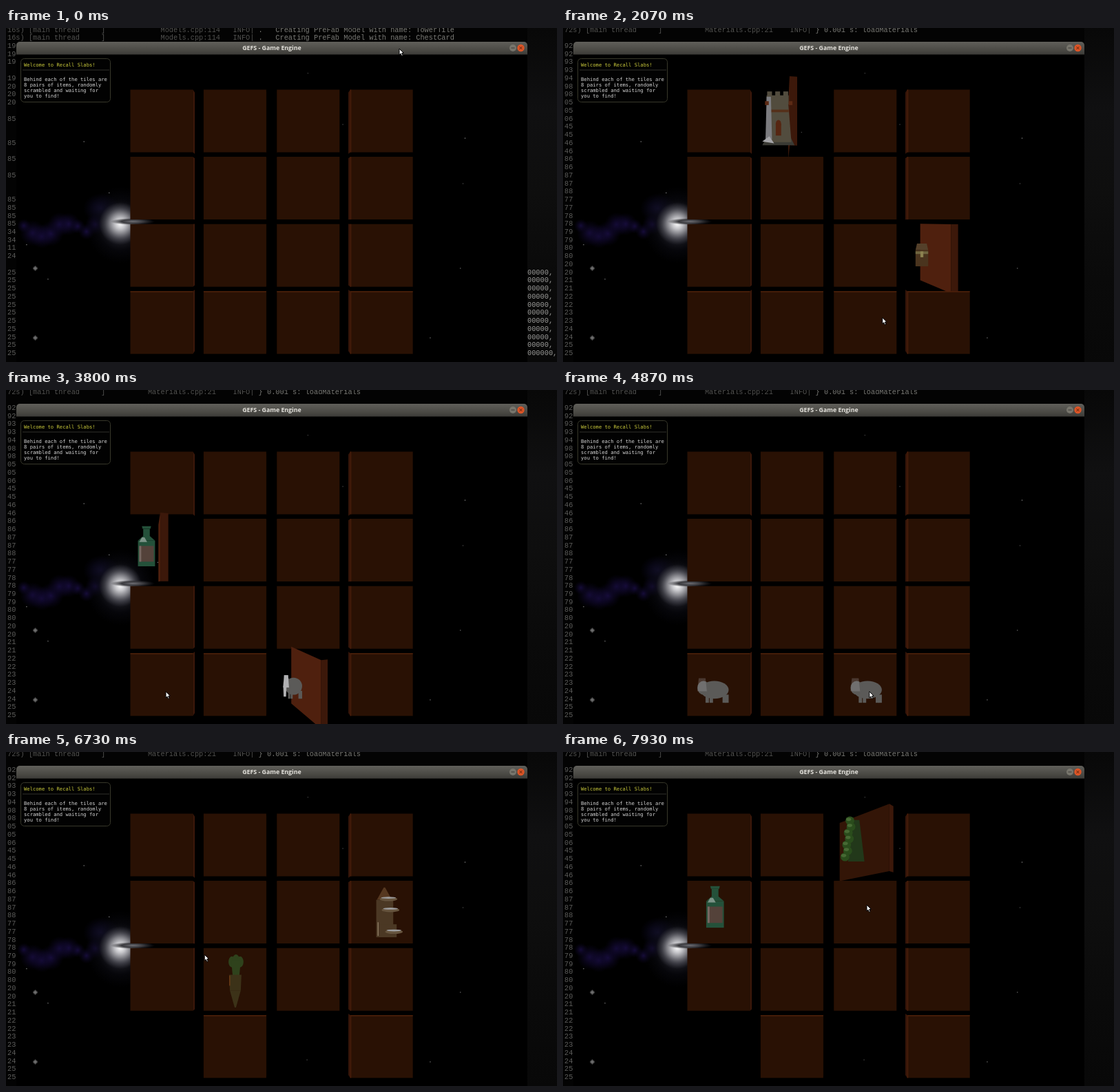
An HTML page with a canvas that plays this animation: 800x485 px, repeating every 8 s.

```html
<!DOCTYPE html>
<html lang="en">
<head>
<meta charset="utf-8">
<title>Tile game</title>
<style>
  html, body { margin: 0; width: 100%; height: 100%; overflow: hidden; background: #000; }
  canvas { display: block; width: 800px; height: 485px; }
</style>
</head>
<body>
<canvas id="stage" width="800" height="485"></canvas>
<script>
const ctx = document.getElementById('stage').getContext('2d');
const LOOP = 8000, FLIP = 400, FOCAL = 440;
const EYE = { x: 386, y: 281 };
const HALF = 45.5, THICK = 5, ITEM_DEPTH = 24;
const colX = col => 226 + col * 106.4;
const rowY = row => 135 + row * 97.6;
const LOG_CHANGE = 140;

const clamp = v => Math.max(0, Math.min(1, v));
const smooth = k => k * k * (3 - 2 * k);

function seeded(seed) {
  return () => (seed = (seed * 16807) % 2147483647) / 2147483647;
}

function fillPoly(points, color) {
  ctx.fillStyle = color;
  ctx.beginPath();
  points.forEach(([x, y]) => ctx.lineTo(x, y));
  ctx.closePath();
  ctx.fill();
}
function rect(x, y, w, h, color) {
  ctx.fillStyle = color;
  ctx.fillRect(x, y, w, h);
}
function oval(x, y, rx, ry, color) {
  ctx.fillStyle = color;
  ctx.beginPath();
  ctx.ellipse(x, y, rx, ry, 0, 0, Math.PI * 2);
  ctx.fill();
}
// Symmetric trapezoid around x, from half width a at the top to b at the bottom
function taper(x, top, a, bottom, b, color) {
  fillPoly([[x - a, top], [x + a, top], [x + b, bottom], [x - b, bottom]], color);
}
function glow(x, y, rx, ry, ...colors) {
  const g = ctx.createRadialGradient(0, 0, 0, 0, 0, 1);
  colors.forEach((color, i) => g.addColorStop(i / (colors.length - 1), color));
  ctx.save();
  ctx.translate(x, y);
  ctx.scale(rx, ry);
  oval(0, 0, 1, 1, g);
  ctx.restore();
}
function write(text, x, y, font, color) {
  ctx.font = font;
  ctx.fillStyle = color;
  ctx.fillText(text, x, y);
}

// Items are drawn around the projected centre of their tile; lit is 0..1.
// round: share of the width that stays when the item is seen from the side
const items = {
  tower: { round: 0.8, draw() {
    taper(5, 24, 22, 37, 30, '#3a3a34');
    taper(5, -30, 18, 32, 24, '#524c3e');
    rect(-17, -40, 41, 14, '#524c3e');
    for (let i = 0; i < 3; i++) rect(-16 + i * 15, -46, 9, 8, '#524c3e');
    taper(-13, -38, 4, 28, 6, '#7c7c80');
    fillPoly([[-25, 31], [-12, 23], [-3, 34]], '#a4a4a8');
    rect(-8, -18, 32, 4, '#55301a');
    for (const x of [-20, 24]) rect(x, -31, 7, 6, '#5c2a14');
    oval(5, 4, 5, 6, '#562612');
    rect(0, 4, 10, 18, '#562612');
  } },
  chest: { round: 0.5, draw() {
    taper(0, -18, 13, -8, 17, '#54402a');
    rect(-17, -8, 34, 25, '#4a341e');
    rect(-17, -6, 34, 4, '#706640');
    rect(-4, -6, 8, 9, '#8c8250');
  } },
  sheep: { round: 0.4, draw(lit) {
    const wool = '#5b5a58';
    for (const x of [-12, -6, 13, 17]) rect(x, 8, 5, 12, wool);
    oval(1, 1, 21, 13, wool);
    oval(-15, -2, 9, 10, wool);
    ctx.globalAlpha = 0.25 + 0.75 * lit;
    taper(-17, -16, 5, 3, 7, '#b0b0b2');
    ctx.globalAlpha = lit;
    taper(-20, 0, 4, 17, 3, '#b0b0b2');
    ctx.globalAlpha = 1;
  } },
  bottle: { round: 1, draw() {
    const glass = '#24513a';
    taper(2, -36, 7, -32, 6, glass);
    rect(-3, -32, 10, 12, glass);
    taper(2, -21, 5, -14, 13, glass);
    rect(-11, -14, 26, 39, glass);
    taper(-3, -19, 2, -12, 6, '#7c9488');
    rect(-9, -6, 22, 24, '#54423a');
    rect(-9, -6, 3, 24, '#776862');
  } },
  house: { round: 0.5, draw() {
    taper(-3, -34, 1, -16, 11, '#563820');
    rect(-15, -16, 25, 55, '#4b3824');
    rect(-10, 20, 25, 19, '#4b3824');
    for (const [x, y] of [[3, -18], [6, -2], [11, 30]]) {
      oval(x, y + 1, 13, 3, '#66543e');
      oval(x, y - 1, 11, 1.4, '#9c9c9e');
    }
    rect(-13, 17, 1.5, 20, '#8a7860');
  } },
  carrot: { round: 0.9, draw() {
    for (let i = -1; i <= 1; i++) oval(4 + i * 6, -31 + Math.abs(i) * 3, 5, 8, '#2f421c');
    taper(4, -30, 7, -8, 5, '#2f421c');
    taper(3, -9, 9, 14, 8, '#3c3218');
    taper(3, 14, 8, 39, 1, '#3c3218');
    rect(-6, -8, 1.5, 15, '#6a3a16');
  } },
  tree: { round: 0.8, draw() {
    taper(3, -33, 5, 29, 13, '#22381a');
    for (let i = 0; i < 7; i++) {
      const x = -7 - i * 1.3 + (i % 2) * 3, y = -32 + i * 9;
      oval(x, y, 7, 6.5, '#2a4c1c');
      oval(x - 2, y - 2, 4, 2.5, '#476a34');
    }
  } }
};

// Each click turns a tile; back is when a wrong pair turns again.
const clicks = [
  { at: 600, col: 1, row: 0, back: 1890 },
  { at: 1131, col: 3, row: 2, back: 1890 },
  { at: 2330, col: 2, row: 3, back: 3650 },
  { at: 2900, col: 0, row: 1, back: 3650 },
  { at: 3930, col: 0, row: 3 },
  { at: 4440, col: 2, row: 3 },
  { at: 5520, col: 3, row: 1, back: 6860 },
  { at: 6100, col: 1, row: 2, back: 6860 },
  { at: 7110, col: 0, row: 1 },
  { at: 7630, col: 2, row: 0 }
];
const PAIR_FOUND = 5220;
const hidden = { '1,0': 'tower', '3,2': 'chest', '2,3': 'sheep', '0,3': 'sheep',
  '0,1': 'bottle', '3,1': 'house', '1,2': 'carrot', '2,0': 'tree' };

const tiles = Array.from({ length: 16 }, (_, i) => {
  const col = i % 4, row = i >> 2;
  return { col, row, name: hidden[col + ',' + row],
    turns: clicks.filter(c => c.col === col && c.row === row) };
});

function angleAt(tile, t) {
  let open = 0;
  for (const { at, back = Infinity } of tile.turns) {
    open += clamp((t - at) / FLIP) - clamp((t - back) / FLIP);
  }
  return open * Math.PI;
}

function project(tile, angle, x, y, z) {
  const sin = Math.sin(angle), cos = Math.cos(angle);
  const scale = FOCAL / (FOCAL + THICK + x * sin - z * cos);
  return [
    EYE.x + (colX(tile.col) + x * cos + z * sin - EYE.x) * scale,
    EYE.y + (rowY(tile.row) + y - EYE.y) * scale,
    scale
  ];
}

function drawItem(tile, angle, lit) {
  if (!tile.name || angle === 0) return;
  const { round, draw } = items[tile.name];
  const [x, y, scale] = project(tile, angle, 0, 0, -ITEM_DEPTH);
  const size = scale * (FOCAL - ITEM_DEPTH) / FOCAL;
  ctx.save();
  ctx.translate(x, y);
  ctx.scale(size * (round + (1 - round) * Math.abs(Math.cos(angle))), size);
  draw(lit);
  ctx.restore();
}

// Draws one upright side of the slab, from edge a to edge b, if it faces the viewer.
function drawFace(tile, angle, a, b, color) {
  const corner = ([x, z], y) => project(tile, angle, x * HALF, y * HALF, z * THICK);
  const face = [corner(a, -1), corner(b, -1), corner(b, 1), corner(a, 1)];
  if (face[1][0] > face[0][0]) fillPoly(face, color);
}

function drawTile(tile, t) {
  if (tile.name === 'sheep' && t >= PAIR_FOUND) return;
  const angle = angleAt(tile, t), open = angle > Math.PI / 2;
  const lit = open ? clamp((Math.sin(angle) - 0.65) / 0.2) : 0;
  if (!open) drawItem(tile, angle, 0);
  drawFace(tile, angle, [-1, 1], [1, 1], '#291104');
  drawFace(tile, angle, [1, -1], [-1, -1], `rgb(${41 + 38 * lit},${17 + 15 * lit},${4 + 10 * lit})`);
  drawFace(tile, angle, [-1, -1], [-1, 1], '#3c180a');
  drawFace(tile, angle, [1, 1], [1, -1], '#3c180a');
  if (Math.sin(angle) < 0.01) {
    const left = colX(tile.col) - HALF, top = rowY(tile.row) - HALF;
    if (tile.row === 3) rect(left, top, HALF * 2, 1.2, '#5a260c');
    if (tile.col === 3) rect(left, top, 1.5, HALF * 2, '#4a1e0a');
  }
  if (open) drawItem(tile, angle, lit);
}

const LOG_FONT = '10.3px "Liberation Mono", monospace';
const EARLY_ROWS = '###.####.#..#.#.#..########.###########';
const EARLY = [[2, 19], [7, 20], [11, 85], [25, 34], [27, 11], [28, 24], [30, 25]];
const LATE = [[2, 92], [7, 98], [9, 5], [12, 45], [16, 86], [21, 77], [29, 20]];

function logText(text, col, row, color = '#525250') {
  write(text, 2 + col * 6.18, 5.5 + row * 11.74, LOG_FONT, color);
}
function logLine(row, stamp, fileCol, file, message) {
  logText(stamp + 's) [main thread     ]', 0, row);
  logText(file, fileCol, row);
  logText('INFO|', 53, row);
  logText(message, 59, row, '#7a7a76');
}

function drawDesktop(t) {
  rect(0, 0, 800, 485, '#030303');
  const side = ctx.createLinearGradient(0, 0, 0, 485);
  ['#080808', '#101011', '#0e0e0e', '#0a0a0a', '#080808'].forEach((c, i) => side.addColorStop(i / 4, c));
  rect(757, 0, 43, 485, side);

  const early = t < LOG_CHANGE;
  if (early) {
    ['TowerTile', 'ChestCard'].forEach((model, row) =>
      logLine(row, '16', 36, 'Models.cpp:114', '.   Creating PreFab Model with name: ' + model));
    for (let row = 30; row <= 40; row++) {
      write(row < 40 ? '00000,' : '000000,', 757, 5.5 + row * 11.74, LOG_FONT, '#9a9a98');
    }
  } else {
    logLine(0, '72', 33, 'Materials.cpp:21', '} 0.001 s: loadMaterials');
  }
  for (let row = 2; row <= 40; row++) {
    if (early && EARLY_ROWS[row - 2] === '.') continue;
    const [first, value] = (early ? EARLY : LATE).findLast(block => block[0] <= row);
    const stamp = early ? value : value + (row - first >> 1);
    logText(String(stamp).padStart(2, '0'), 0, row, '#5c5c5a');
  }
}

function drawSpace() {
  rect(15, 38, 742, 447, '#000');
  const random = seeded(41);
  for (let i = 0; i < 9; i++) {
    const r = 10 + random() * 9;
    glow(26 + i * 13, 290 + (random() - 0.5) * 26, r, r, '#160c3a', '#0c062400');
  }
  glow(138, 262, 26, 22, '#141030', '#0a082000');
  glow(166, 286, 50, 56, '#505058', '#24242c', '#0c0c1480', '#08081000');
  glow(166, 284, 31, 31, '#ffffff', '#c4c4c8', '#7c7c82', '#50505890', '#40404800');
  glow(184, 281, 32, 5, '#707076', '#38383c', '#20202400');
  for (let i = 0; i < 22; i++) {
    const shade = 60 + random() * 70;
    rect(20 + random() * 720, 42 + random() * 430, 1.3, 1.3, `rgb(${shade},${shade},${shade})`);
  }
  for (const y of [349, 450]) {
    glow(42.5, y, 4, 4, '#a8a8a8', '#505050', '#30303000');
    rect(39, y - 0.4, 7, 0.8, '#666');
    rect(42.1, y - 3.5, 0.8, 7, '#666');
  }
}

function drawPanel() {
  ctx.strokeStyle = '#38382a';
  ctx.lineWidth = 1;
  ctx.beginPath();
  ctx.roundRect(21.5, 44.5, 130, 63, 5);
  ctx.fillStyle = '#020202';
  ctx.fill();
  ctx.stroke();
  rect(24, 60.5, 126, 1, '#30302a');
  const font = '7.18px "DejaVu Sans Mono", monospace';
  write('Welcome to Recall Slabs!', 26, 56, font, '#cccc3c');
  ['Behind each of the tiles are', '8 pairs of items, randomly', 'scrambled and waiting for', 'you to find!']
    .forEach((line, i) => write(line, 26, 77 + i * 8, font, '#d6d6d6'));
}

function drawTitleBar() {
  const bar = ctx.createLinearGradient(0, 20, 0, 38);
  ['#605f5a', '#504f4a', '#3e3d39'].forEach((c, i) => bar.addColorStop(i / 2, c));
  ctx.fillStyle = bar;
  ctx.beginPath();
  ctx.roundRect(15, 20, 742, 18.5, [5, 5, 0, 0]);
  ctx.fill();
  ctx.textAlign = 'center';
  write('GEFS - Game Engine', 386, 32.3, 'bold 8.8px "Open Sans", sans-serif', '#e4e2dc');
  ctx.textAlign = 'left';
  oval(736, 29, 5, 5, '#77756c');
  rect(733.5, 28.5, 5, 1, '#3c3b37');
  oval(747.5, 29, 5.2, 5.2, '#dc5426');
  ctx.strokeStyle = '#5c250d';
  ctx.beginPath();
  for (const d of [-2, 2]) {
    ctx.moveTo(747.5 - d, 27);
    ctx.lineTo(747.5 + d, 31);
  }
  ctx.stroke();
}

// The pointer rests on each clicked tile and travels shortly before the next click.
const TRAVEL = 480, SETTLE = 130;
const stops = [
  { at: 0, x: 571, y: 30 },
  ...clicks.map(({ at, col, row }) => ({ at, x: colX(col) + 6, y: rowY(row) + 10 })),
  { at: 8060, x: 441, y: 222 }
];

function drawPointer(t) {
  const next = stops.findIndex(stop => stop.at > t);
  const from = stops[next - 1], to = stops[next];
  const arrive = to.at - SETTLE, leave = Math.max(from.at, arrive - TRAVEL);
  const k = smooth(clamp((t - leave) / (arrive - leave)));
  ctx.save();
  ctx.translate(from.x + (to.x - from.x) * k, from.y + (to.y - from.y) * k);
  ctx.strokeStyle = '#000';
  ctx.lineWidth = 1;
  fillPoly([[0, 0], [0, 9], [2, 7.2], [3.6, 10.6], [5.2, 9.9], [3.7, 6.6], [6.4, 6.4]], '#f6f6f6');
  ctx.stroke();
  ctx.restore();
}

function render(t) {
  drawDesktop(t);
  drawSpace();
  tiles.forEach(tile => drawTile(tile, t));
  drawPanel();
  drawTitleBar();
  drawPointer(t);
}

const start = performance.now();
function tick() {
  render((performance.now() - start) % LOOP);
  requestAnimationFrame(tick);
}
tick();
</script>
</body>
</html>
```
